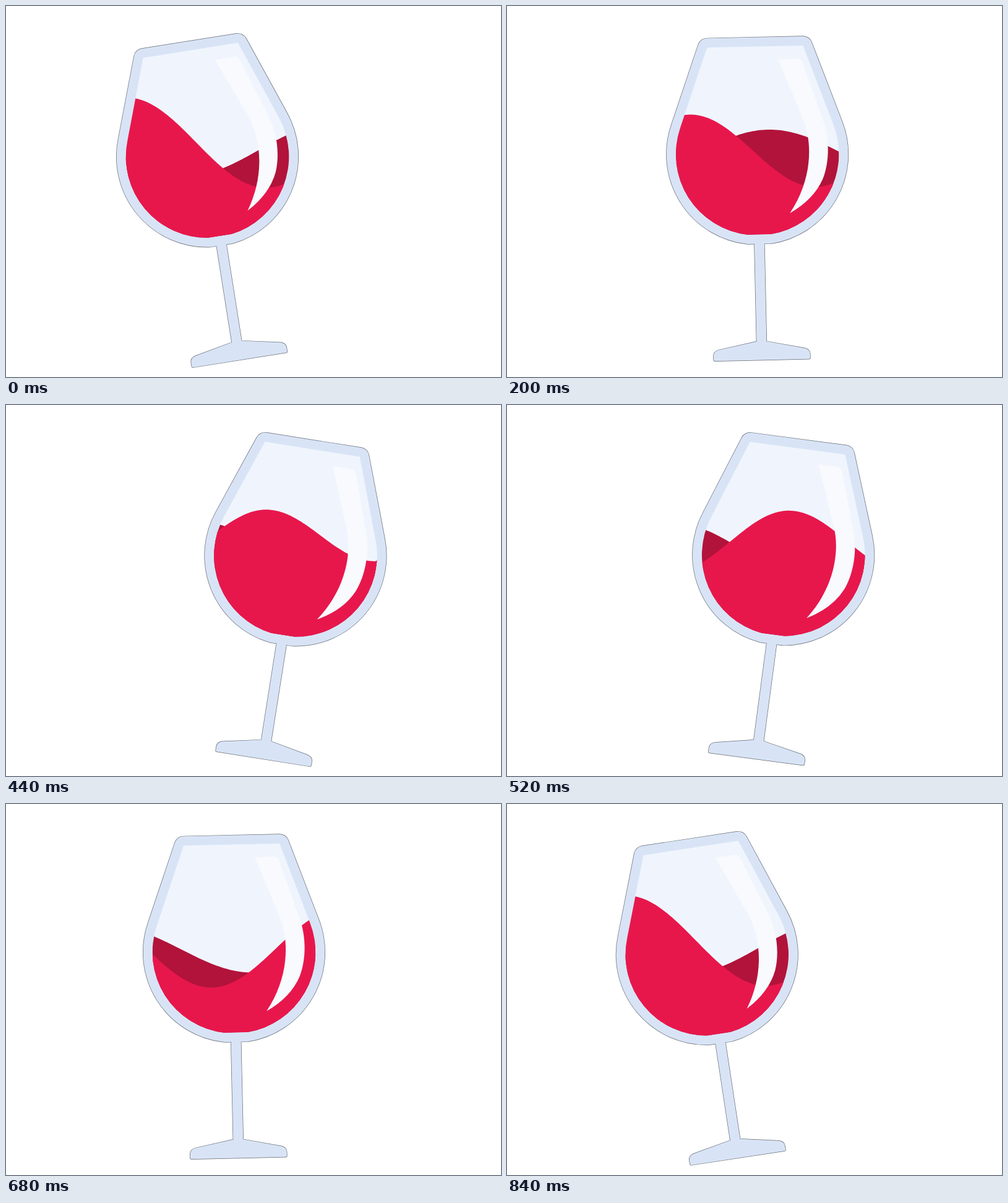
Animation, 800 px wide and 600 px high, one loop 880 ms. Source, as an HTML page:

```html
<!DOCTYPE html>
<html lang="en">
<head>
<meta charset="utf-8">
<title>Swirling wine</title>
<style>
  html, body { margin: 0; width: 100%; height: 100%; overflow: hidden; background: #fff; }
  svg { display: block; width: 800px; height: 600px; }
  .rim { fill: none; stroke-linejoin: round; }
</style>
</head>
<body>
<svg viewBox="0 0 800 600">
  <defs>
    <path id="bowl" d="M-77.5-507H77.5L123.6-378.7A131.2 131.2 0 0 1 18-203H-18A131.2 131.2 0 0 1-123.6-378.7Z"/>
    <path id="foot" d="M-8-192V-30L-70-17.5Q-78-15-78-8V-2Q-78 0-76 0H76Q78 0 78-2V-8Q78-15 70-17.5L8-30V-192Z"/>
    <clipPath id="inside"><use href="#bowl"/></clipPath>
  </defs>
  <g id="glass">
    <g stroke="#666a72" stroke-linejoin="round">
      <use href="#bowl" class="rim" stroke-width="31.4"/>
      <use href="#foot" fill="none" stroke-width="1.4"/>
    </g>
    <use href="#foot" fill="#d8e4f6"/>
    <use href="#bowl" class="rim" stroke="#d8e4f6" stroke-width="30"/>
    <use href="#bowl" fill="#f0f5fd"/>
    <g clip-path="url(#inside)">
      <g id="wine">
        <path id="back" fill="#b2133a"/>
        <path id="front" fill="#e7174c"/>
      </g>
    </g>
    <path fill="#f8fafe" d="M37-485.5H67Q73-485.5 76-480L107-386C117-357 117-320 105-291Q90-258 50.5-236.5C88-290 90-350 75-388Z"/>
  </g>
</svg>
<script>
const LOOP = 880, TICK = 40, FLOOR = 572.5, ARM = 335;
const { PI, sin, cos, exp } = Math;

const $ = id => document.getElementById(id);
const glass = $('glass'), wine = $('wine'), back = $('back'), front = $('front');

// area under a cosine wave: crest position, half wavelength, mean level, amplitude
function pool(crest, half, level, amp) {
  let d = 'M-144 450';
  for (let x = -144; x <= 144; x += 4) {
    d += `L${x} ${(level - amp * cos(PI * (x - crest) / half)).toFixed(2)}`;
  }
  return d + 'L144 450Z';
}

function swing(t) {
  const turn = 2 * PI * t / LOOP;
  const lean = -9 * cos(turn);
  const cx = 396.7 - 73.8 * cos(turn + 0.25);
  const offset = ARM * sin(lean * PI / 180);
  glass.setAttribute('transform', `translate(${cx - offset} ${FLOOR}) rotate(${lean})`);
  // keep the liquid level while the glass leans
  wine.setAttribute('transform', `rotate(${-lean}) translate(${offset} ${-FLOOR})`);
}

// the front wave runs right and the back wave left, one wavelength per loop
function slosh(t) {
  const s = t / (LOOP - TICK), turn = 2 * PI * s;
  const once = (1 - cos(turn)) / 2, twice = (1 - cos(2 * turn)) / 2;
  const surge = exp(-(((t - 580) / 60) ** 2));
  front.setAttribute('d', pool(
    -130 + 450 * s - 154 * once - 14 * twice,
    225 - 50 * once + 18 * surge,
    221 - 10.5 * once + 18 * twice,
    73 - 31.5 * once + 10 * surge));
  back.setAttribute('d', pool(
    205 - 480 * s - 110 * once - 20 * sin(turn),
    240 - 30 * once,
    232 + 4 * twice,
    43 - 7 * twice + 5 * surge));
}

const start = performance.now();
function loop() {
  const now = (performance.now() - start) % LOOP;
  const t = Math.floor(now / TICK) * TICK;
  swing(t);
  slosh(t);
  requestAnimationFrame(loop);
}
loop();
</script>
</body>
</html>
```
